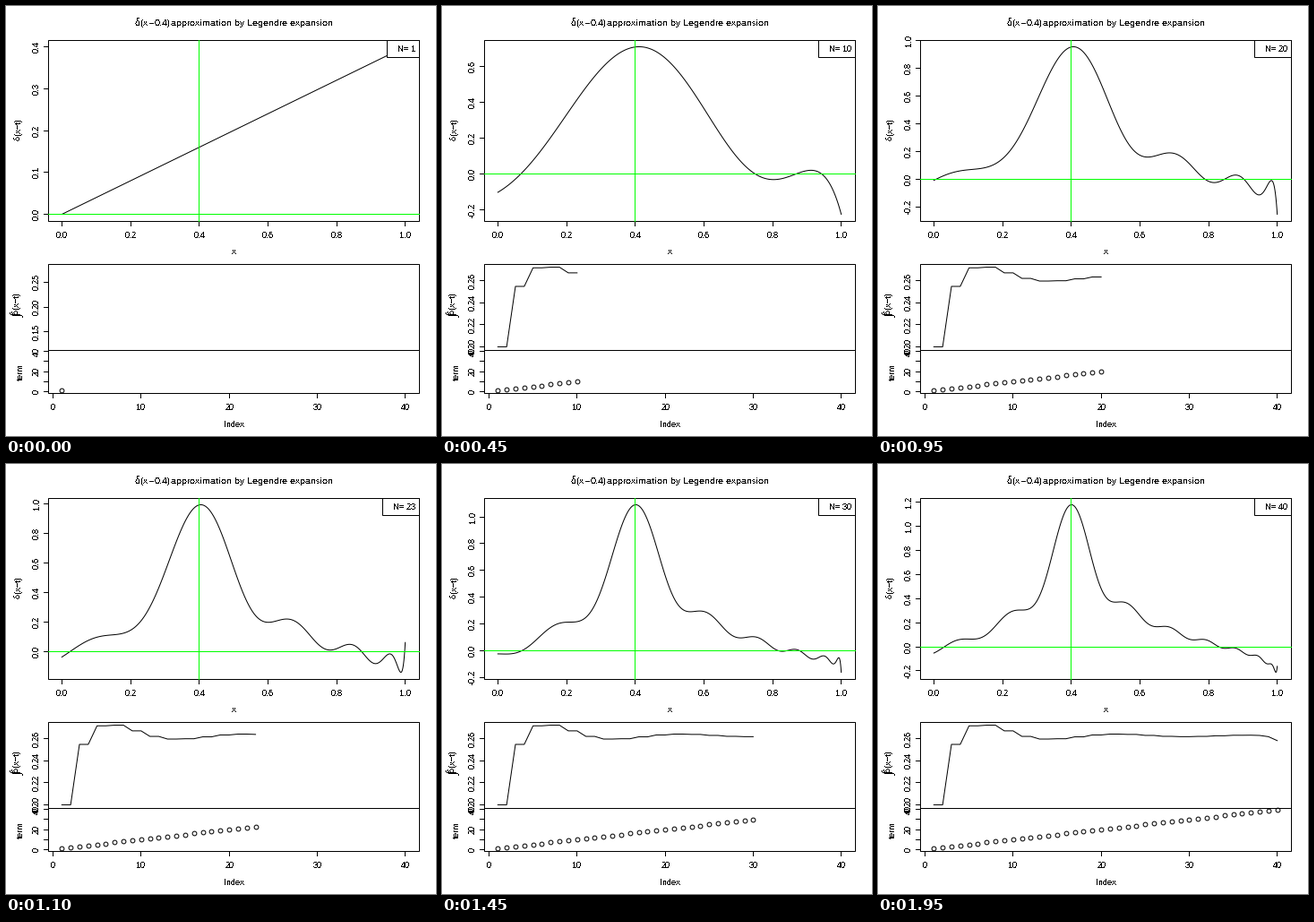
Recreate the animation shown at these times as a matplotlib script. Size 480x480 px, loop 2 s.

```python
import numpy as np
import matplotlib as mpl
import matplotlib.pyplot as plt
from matplotlib.animation import FuncAnimation
from matplotlib.patches import Rectangle

SIZE, DPI = 480, 72          # at 72 dpi one point is one pixel
TERMS, T = 40, 0.4
GREEN = "#00ff00"
LEFT, RIGHT = 47, 461
TOP, MID, LOW = (38, 240), (288, 384), (384, 432)

mpl.rcParams.update({
    "font.family": "Liberation Sans",
    "text.hinting": "default",
    "text.hinting_factor": 1,
    "text.antialiased": False,
    "path.simplify": False,
})


def legendre(x, top):
    """P_0 .. P_top at x, by the three-term recurrence."""
    x = np.asarray(x, float)
    p = [np.ones_like(x), x]
    for n in range(1, top):
        p.append(((2 * n + 1) * x * p[n] - n * p[n - 1]) / (n + 1))
    return np.array(p)


xs = np.linspace(0, 1, 1001)
order = np.arange(1, TERMS + 1)
at_t = legendre(T, TERMS)
at_0 = legendre(0, TERMS + 1)

# Round-off of the power form grows with the order, mostly near x = 1.
POWER = 24
drift = -0.12 * 4.0 ** (order - TERMS)
sums = np.cumsum(legendre(xs, TERMS)[1:] * at_t[1:, None], axis=0)
sums += drift[:, None] * xs ** POWER
areas = np.cumsum(at_t[1:] * (at_0[:-2] - at_0[2:]) / (2 * order + 1))
areas += drift / (POWER + 1)


def scale(lo, hi, start, end):
    """Map lo..hi to pixels with a 4 % margin on both sides."""
    pad = 0.04 * (hi - lo)
    lo, hi = lo - pad, hi + pad
    return lambda v: start + (np.asarray(v) - lo) / (hi - lo) * (end - start)


def pretty(lo, hi):
    """Round tick values inside the padded range, and their decimals."""
    pad = 0.04 * (hi - lo)
    lo, hi = lo - pad, hi + pad
    cell = (hi - lo) / 5
    base = 10 ** np.floor(np.log10(cell))
    unit = base
    for k, bias in ((2, 0.8), (5, 1.7), (10, 0.8)):
        if k * base - cell < bias * (cell - unit):
            unit = k * base
        else:
            break
    ticks = np.arange(np.ceil(lo / unit), np.floor(hi / unit) + 1) * unit
    return ticks, max(0, -int(np.floor(np.log10(unit) + 1e-9)))


fig = plt.figure(figsize=(SIZE / DPI, SIZE / DPI), dpi=DPI, facecolor="white")
ax = fig.add_axes([0, 0, 1, 1])


def curve(x, y):
    ax.plot(x, y, color="black", lw=1, zorder=2)


def rule(x, y, color="black", z=2):
    """Straight line on whole pixels."""
    ax.plot(np.floor(x), np.floor(y), color=color, lw=1, zorder=z)


def text(x, y, s, size=9, ha="center", up=False, **kw):
    ax.text(x, y, s, size=size, ha=ha, va="baseline", zorder=6,
            rotation=90 if up else 0, rotation_mode="anchor", **kw)


def box(x0, y0, x1, y1, fill="none", z=3):
    ax.add_patch(Rectangle((x0, y0), x1 - x0, y1 - y0, fc=fill, ec="black",
                           lw=1, zorder=z))


def x_axis(pos, values, fmt, y):
    for v in values:
        px = pos(v)
        rule([px, px], [y, y + 5])
        text(px, y + 19, fmt.format(v))


def y_axis(pos, values, digits):
    last = np.inf
    for v in values:
        py = pos(v)
        rule([LEFT - 5, LEFT], [py, py])
        label = f"{round(v, digits) + 0.0:.{digits}f}"
        half = 2.2 * len(label)
        if py + half < last - 5:      # skip crowded labels
            text(37, py, label, up=True)
            last = py - half


def labels():
    serif = dict(family="Liberation Serif")
    text(144, 22, "δ", 11.5, "left", **serif)
    for x, s in ((150, "(x"), (160, "−"), (166, "0.4)"),
                 (184, "approximation by Legendre expansion")):
        text(x, 22, s, 10, "left")
    text(254, 277, "x")
    text(255, 470, "Index")
    text(16, 150, "δ", 9.5, "left", True, **serif)
    text(16, 144.5, "(x−t)", 9, "left", True)
    text(17, 347, "∫", 15, "left", True, **serif)
    text(14, 344, "δ", 9.5, "left", True, **serif)
    text(14, 338.5, "(x−t)", 9, "left", True)
    text(19, 408, "term", up=True)


def top_panel(n):
    y = sums[n - 1]
    lo, hi = y.min(), y.max()
    px, py = scale(0, 1, LEFT, RIGHT), scale(lo, hi, TOP[1], TOP[0])
    curve(px(xs), py(y))
    box(LEFT, TOP[0], RIGHT, TOP[1])
    rule([LEFT, RIGHT], [py(0)] * 2, GREEN, 4)
    rule([px(T)] * 2, TOP, GREEN, 4)
    x_axis(px, np.arange(6) / 5, "{:.1f}", TOP[1])
    y_axis(py, *pretty(lo, hi))
    box(425 if n < 10 else 420, TOP[0], RIGHT, 57, "white", 5)
    text(457, 51, f"N= {n}", ha="right")


def lower_panels(n):
    px = scale(1, TERMS, LEFT, RIGHT)
    k, area = order[:n], areas[:n]
    lo, hi = area.min(), area.max()
    if hi - lo < 1e-9:
        lo, hi = 0.6 * lo, 1.4 * hi
    py = scale(lo, hi, MID[1], MID[0])
    curve(px(k), py(area))
    y_axis(py, *pretty(lo, hi))
    box(LEFT, MID[0], RIGHT, MID[1])

    py = scale(0, TERMS, LOW[1], LOW[0])
    ax.plot(px(k), py(k), "o", ms=4.8, mfc="none", mec="black", mew=1)
    tens = np.arange(0, TERMS + 1, 10)
    x_axis(px, tens, "{}", LOW[1])
    y_axis(py, tens.astype(float), 0)
    box(LEFT, LOW[0], RIGHT, LOW[1])


def draw(i):
    ax.clear()
    ax.set(xlim=(0, SIZE), ylim=(SIZE, 0))
    ax.axis("off")
    labels()
    top_panel(i + 1)
    lower_panels(i + 1)
    return []


anim = FuncAnimation(fig, draw, frames=TERMS, init_func=lambda: [],
                     interval=50, repeat=True, repeat_delay=0)
plt.show()
```
